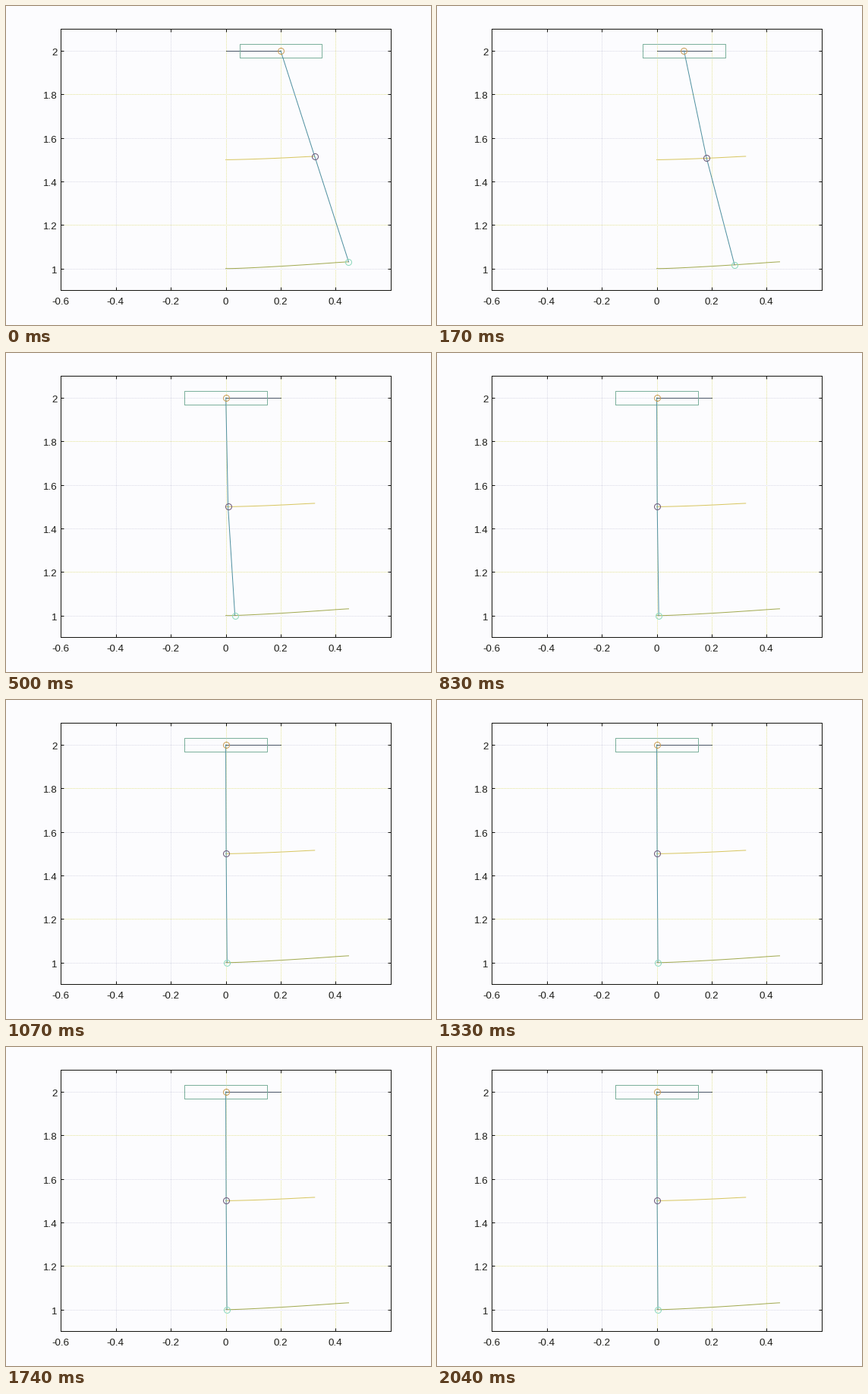
These frames come from a looping animation (560 px wide and 420 px high, 2.08 s). A matplotlib script:

```python
import numpy as np
import matplotlib.pyplot as plt
from matplotlib.animation import FuncAnimation

W, H, DPI = 560, 420, 100
LOOP, TICK = 2080, 10            # ms
STEP, POSES = 33.36, 62          # ms per pose, poses per loop
LEFT, RIGHT, TOP, BOTTOM = 72.4, 506.7, 30.4, 374.4
PX = 72 / DPI                    # one pixel in points

PAPER, INK = "#fcfcfe", "#141410"
GREY, YELLOW = "#dadae6", "#e4e498"


def settle(x):
    """Response of three equal lags, from 1 down to 0."""
    return (1 + x + x * x / 2) * np.exp(-x)


def pose(i):
    """Cart, middle joint and tip of the double pendulum."""
    cart = 0.2 * np.exp(-0.028 * i * i)
    a1 = 0.003 + 0.247 * settle(0.415 * i)
    a2 = 0.0055 + 0.2445 * settle(0.295 * i)
    mx, my = cart + 0.5 * np.sin(a1), 2 - 0.5 * np.cos(a1)
    tx, ty = mx + 0.5 * np.sin(a2), my - 0.5 * np.cos(a2)
    return np.array([[cart, 2], [mx, my], [tx, ty]])


fig = plt.figure(figsize=(W / DPI, H / DPI), dpi=DPI, facecolor=PAPER)
ax = fig.add_axes([LEFT / W, 1 - BOTTOM / H,
                   (RIGHT - LEFT) / W, (BOTTOM - TOP) / H],
                  facecolor=PAPER)
ax.set_xlim(-0.6, 0.6)
ax.set_ylim(0.9, 2.1)

xticks = np.arange(-3, 4) / 5
yticks = np.arange(5, 11) / 5
ax.set_xticks(xticks)
ax.set_yticks(yticks)
ax.tick_params(direction="in", length=4 * PX, width=PX, color=INK,
               top=True, right=True, labelbottom=False, labelleft=False)
for spine in ax.spines.values():
    spine.set(color=INK, linewidth=PX)

# Half a dash of offset puts each dot on a whole pixel
dots = dict(lw=PX, ls=(0.5, (1, 1)), zorder=0.5)
for x in xticks[1:-1]:
    ax.axvline(x, color=YELLOW if x >= 0 else GREY, **dots)
for y in yticks:
    ax.axhline(y, color=YELLOW if y in (1.2, 1.8) else GREY, **dots)


def label(x, y, value, ha):
    fig.text(x / W, 1 - y / H, f"{value:g}", ha=ha, va="baseline",
             family="Liberation Sans", size=13.33 * PX, color="#1c1c18")


for x in xticks[:-1]:
    label(LEFT - 0.5 + (x + 0.6) / 1.2 * (RIGHT - LEFT), 393.3, x, "center")
for y in yticks:
    label(67.5, BOTTOM - (y - 0.9) / 1.2 * (BOTTOM - TOP) + 5.8, y, "right")

# Whole paths of the three joints, ending at rest
rest = np.array([[0, 2], [0, 1.5], [0, 1]])
paths = np.array([pose(i) for i in range(POSES)] + [rest])
for k, color in enumerate(["#4a5668", "#d8c660", "#a2aa50"]):
    ax.plot(*paths[:, k].T, color=color, lw=PX, zorder=2)

box, = ax.plot([], [], color="#7cb09c", lw=PX, zorder=3)
rods, = ax.plot([], [], color="#5090a0", lw=PX, zorder=4)
joints = [ax.plot([], [], "o", ms=8 * PX, mfc="none", mec=c, mew=PX,
                  zorder=5)[0]
          for c in ("#c89c58", "#6c5878", "#8cd8bc")]

BOX_X = 0.15 * np.array([-1, 1, 1, -1, -1])
BOX_Y = 2 + 0.03 * np.array([-1, -1, 1, 1, -1])


def draw(n):
    i = min(int((n * TICK + 5) / STEP), POSES - 1)
    p = pose(i)
    box.set_data(p[0, 0] + BOX_X, BOX_Y)
    rods.set_data(*p.T)
    for dot, (x, y) in zip(joints, p):
        dot.set_data([x], [y])
    return [box, rods, *joints]


anim = FuncAnimation(fig, draw, frames=LOOP // TICK, interval=TICK,
                     repeat=True, repeat_delay=0)
plt.show()
```
